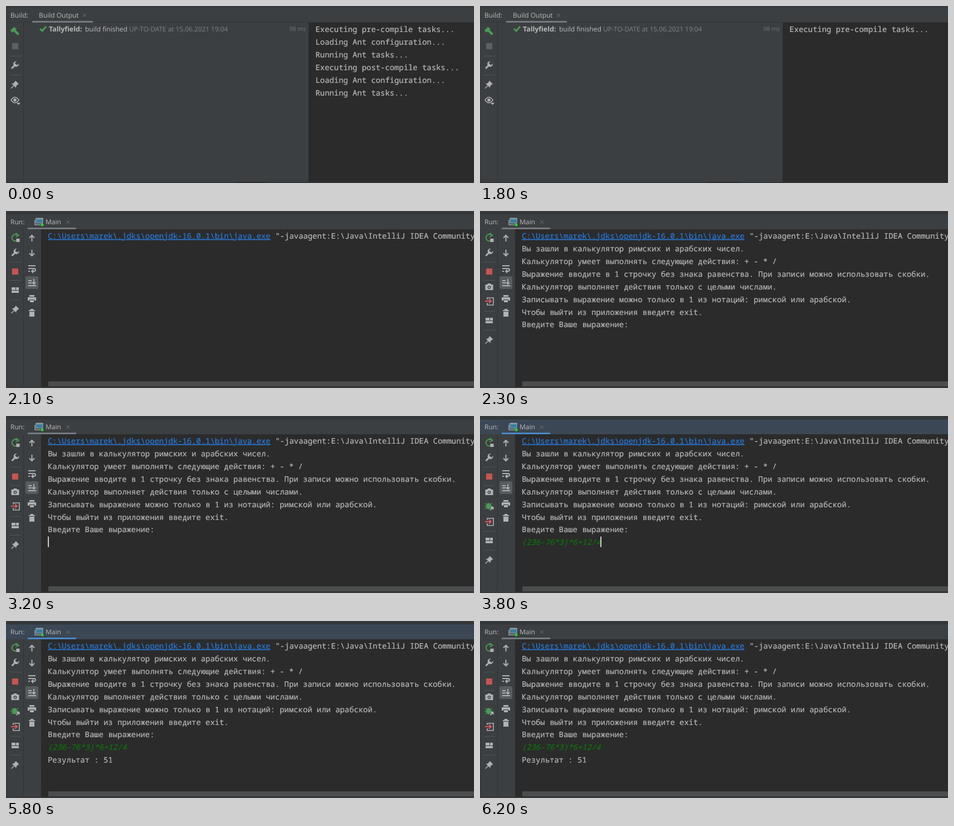
An HTML page that plays this animation: 840 by 320 pixels, repeating every 8 s.

```html
<!DOCTYPE html>
<html lang="ru">
<head>
<meta charset="utf-8">
<style>
html, body { margin: 0; width: 100%; height: 100%; overflow: hidden; background: #3c3f41; }
svg { display: block; width: 840px; height: 320px; }
text { font: 12px "Open Sans", "Noto Sans", sans-serif; fill: #bbb; text-rendering: geometricPrecision; white-space: pre; }
.mono text { font: 13.89px "Noto Sans Mono", "DejaVu Sans Mono", monospace; stroke: #bbb; stroke-width: .2px; }
.mono .link { fill: #287bde; stroke: #287bde; text-decoration: underline; }
.mono .input { fill: #0a780a; stroke: #0a780a; font-style: italic; }
.line { fill: none; stroke: #afb1b3; stroke-width: 2; }
.fill { fill: #afb1b3; }
.sep { stroke: #515456; }
</style>
</head>
<body>
<svg viewBox="0 0 840 320">
  <defs>
    <g id="wrench">
      <path class="line" style="stroke-width:3" d="M-6 6L1 -1"/>
      <path class="fill" d="M3 -7A5 5 0 1 0 7 -3L4 0L0 -3L0 -4Z"/>
    </g>
    <g id="pin">
      <path class="fill" d="M1 -7L7 -1L5 0L2 3L2 6L-6 -2L-3 -2L0 -5Z"/>
      <path class="line" style="stroke-width:1.5" d="M-2 2L-7 7"/>
    </g>
    <g id="layout" class="fill">
      <path d="M-6 -5h7v5h-7zM2 -5h5v5h-5zM-6 1h13v4h-13z"/>
    </g>
    <g id="camera">
      <path class="fill" fill-rule="evenodd" d="M-7 -4h3l2 -2h4l2 2h3v10h-14zM0 -2a3 3 0 1 0 .01 0z"/>
      <circle class="fill" cy="1" r="1.5"/>
    </g>
    <g id="exit">
      <path class="line" style="stroke-width:1.6" d="M-4 -3V-6H7V7H-4V3"/>
      <path d="M-8 0H3M-1 -4L3 0L-1 4" fill="none" stroke="#db5860" stroke-width="2"/>
    </g>
    <g id="bug" fill="none" stroke="#499c54" stroke-width="1.5">
      <ellipse cx="-1" cy="0" rx="3.5" ry="5" fill="#499c54"/>
      <path d="M-8 0H6M-7 -5L5 4M-7 5L5 -5"/>
      <path d="M2 7L7 2M3 2H7V6" stroke="#afb1b3" stroke-width="2"/>
    </g>
    <path id="arrow" class="line" d="M0 6V-5M-4.5 -.5L0 -5L4.5 -.5"/>
  </defs>

  <g id="build">
    <rect width="840" height="320" fill="#3c3f41"/>
    <rect width="840" height="3" fill="#373a3c"/>
    <path d="M0 29.5H840M31.5 30V319" stroke="#323537"/>
    <path d="M1.5 0V320" stroke="#353739"/>
    <rect x="47" y="27" width="109" height="3" fill="#747a80"/>
    <text x="8" y="21">Build:</text>
    <text x="59" y="21">Build Output</text>
    <path d="M138 14l6 6m0 -6l-6 6" stroke="#6e7173"/>
    <rect x="543" y="30" width="297" height="289" fill="#2b2b2b"/>
    <path d="M61 41l4 4l7 -8" fill="none" stroke="#499c54" stroke-width="3"/>
    <text x="77" y="46" style="font-weight:bold;font-size:12.4px">Tallyfield:</text>
    <text x="142" y="46">build finished</text>
    <text x="221" y="46" style="fill:#818486;font-size:11.85px">UP-TO-DATE at 15.06.2021 19:04</text>
    <text id="time" x="538" y="45" text-anchor="end" style="fill:#737678;font-size:10.5px"></text>
    <g class="mono" id="log"></g>
    <g transform="translate(16 46)" fill="#499c54">
      <path d="M-8 -2L-2 -8L3 -5L1 -3L8 4L5 7L-2 0L-5 2Z"/>
    </g>
    <rect x="11" y="67" width="11" height="11" fill="#5e6163"/>
    <path class="sep" d="M7 90.5H27M7 124.5H27"/>
    <use href="#wrench" x="16" y="107"/>
    <use href="#pin" x="16" y="142"/>
    <g transform="translate(16 170)">
      <path class="line" style="stroke-width:1.6" d="M-7 0Q0 -10 7 0Q0 10 -7 0Z"/>
      <circle class="fill" r="2.8"/>
      <path class="fill" d="M3 5h7l-3.5 4z"/>
    </g>
    <rect y="318" width="840" height="2" fill="#323537"/>
    <rect x="412" y="318" width="54" height="2" fill="#292b2d"/>
  </g>

  <g id="run">
    <rect width="840" height="320" fill="#3c3f41"/>
    <rect width="840" height="5" fill="#35383a"/>
    <path d="M0 5.5H840" stroke="#2f3133"/>
    <rect id="head" y="6" width="840" height="27"/>
    <rect id="under" x="39" y="30" width="87" height="3"/>
    <text x="8" y="24">Run:</text>
    <text x="71" y="24">Main</text>
    <path d="M108 17l6 6m0 -6l-6 6" stroke="#6e7173"/>
    <path d="M54 13h12v9h-12z" fill="#387f9e" stroke="#9aa7b0"/>
    <path d="M53 14h14M52 16v9h10" fill="none" stroke="#9aa7b0" stroke-width="1.5"/>
    <circle cx="65" cy="25" r="2.5" fill="#2bd62b"/>
    <path d="M31.5 33V319M1.5 33V319" stroke="#323537"/>
    <rect x="63" y="33" width="777" height="286" fill="#2b2b2b"/>
    <rect x="76" y="308" width="764" height="9" fill="#4c4d4e"/>
    <rect y="318" width="840" height="2" fill="#37393b"/>

    <g transform="translate(16.500 48)">
      <path d="M3 -5A6 6 0 1 0 5 4M1 -8L6 -4L1 -1" fill="none" stroke="#499c54" stroke-width="2"/>
      <rect class="fill" x="2" y="2" width="6" height="6"/>
    </g>
    <use href="#wrench" x="16.500" y="75"/>
    <rect x="11" y="104" width="11" height="11" fill="#c75450"/>
    <path class="sep" d="M7 92.5H27M7 125.5H27"/>
    <use id="cam" href="#camera" x="16.500" y="137"/>
    <use id="debug" href="#bug" x="16.500" y="163"/>
    <use id="leave" href="#exit" x="17" y="0"/>
    <g id="tail">
      <use href="#layout" x="16" y="0"/>
      <path class="sep" d="M7 17.5H27"/>
      <use href="#pin" x="16.500" y="35"/>
    </g>
    <path id="split" class="sep" d="M7 -16.5H27"/>

    <use href="#arrow" x="46.500" y="49"/>
    <use href="#arrow" transform="translate(46.5 76) scale(1 -1)"/>
    <path class="line" style="stroke-width:1.8" d="M40 99H53M40 104H50Q53 104 53 106.5T50 109H47M49 106L46 109L49 112M40 109H43"/>
    <rect x="35" y="118" width="23" height="23" rx="3" fill="#595c5e"/>
    <path class="line" style="stroke-width:1.8" d="M40 126H46M40 130H46M40 135H54M50 123V132M47 129L50 132L53 129"/>
    <path class="fill" fill-rule="evenodd" d="M42 152h9v3h-9zM40 156h14v6h-3v-2h-9v2h-3v-6zM43 161h7v4h-7z"/>
    <path class="fill" d="M41 179h11v2h-11zM44 177h5v2h-5zM42 182h9v9h-9z"/>

    <g class="mono">
      <text x="75" y="50" class="link">C:\Users\marek\.jdks\openjdk-16.0.1\bin\java.exe</text>
      <text x="483.500" y="50">"-javaagent:E:\Java\IntelliJ IDEA Community Edition</text>
      <g id="intro"></g>
      <text id="input" class="input" x="75" y="233">(236-76*3)*6+12/4</text>
      <text id="result" x="75" y="256">Результат : 51</text>
    </g>
    <rect id="caret" width="2" height="19" fill="#d0d0d0"/>
  </g>
</svg>
<script>
const $ = id => document.getElementById(id);
const show = (id, on) => $(id).style.display = on ? '' : 'none';
const fill = (id, color) => $(id).setAttribute('fill', color);
const moveY = (id, y) => $(id).setAttribute('transform', `translate(0 ${y})`);

function addLines(id, x, y, lines) {
  $(id).innerHTML = lines.map((s, i) => `<text x="${x}" y="${Math.round(y + i * 22.9)}">${s}</text>`).join('');
}

const tasks = stage => [`Executing ${stage}-compile tasks...`, 'Loading Ant configuration...', 'Running Ant tasks...'];
addLines('log', 555.5, 47, [...tasks('pre'), ...tasks('post')]);
addLines('intro', 75, 73, [
  'Вы зашли в калькулятор римских и арабских чисел.',
  'Калькулятор умеет выполнять следующие действия: + - * /',
  'Выражение вводите в 1 строчку без знака равенства. При записи можно использовать скобки.',
  'Калькулятор выполняет действия только с целыми числами.',
  'Записывать выражение можно только в 1 из нотаций: римской или арабской.',
  'Чтобы выйти из приложения введите exit.',
  'Введите Ваше выражение:'
]);

// Caret positions: start time, x, y
const carets = [[3200, 75, 218], [3700, 216, 218], [4700, 75, 241], [5000, 75, 264]];

function draw(t) {
  show('build', t < 2100);
  show('run', t >= 2100);
  $('time').textContent = t < 2000 ? '98 ms' : '94 ms';
  const count = t < 1800 ? 6 : Math.floor((t - 1700) / 100);
  [...$('log').children].forEach((line, i) => line.style.display = i < count ? '' : 'none');

  const focus = t >= 3300 && t < 6200;
  fill('head', focus ? '#3b4754' : '#3c3f41');
  fill('under', focus ? '#4a88c7' : '#747a80');

  const tools = t >= 2300, debug = t >= 3300;
  const tail = debug ? 225 : tools ? 198 : 143;
  show('cam', tools);
  show('leave', tools);
  show('debug', debug);
  show('split', tools);
  moveY('leave', debug ? 191 : 163);
  moveY('tail', tail);
  moveY('split', tail);

  show('intro', t >= 2200);
  show('input', t >= 3700);
  show('result', t >= 5000);
  const caret = carets.filter(c => c[0] <= t).pop();
  show('caret', caret && t < 5700);
  if (caret) {
    $('caret').setAttribute('x', caret[1]);
    $('caret').setAttribute('y', caret[2]);
  }
}

const start = performance.now();
function tick() {
  draw((performance.now() - start) % 8000);
  requestAnimationFrame(tick);
}
tick();
</script>
</body>
</html>
```
